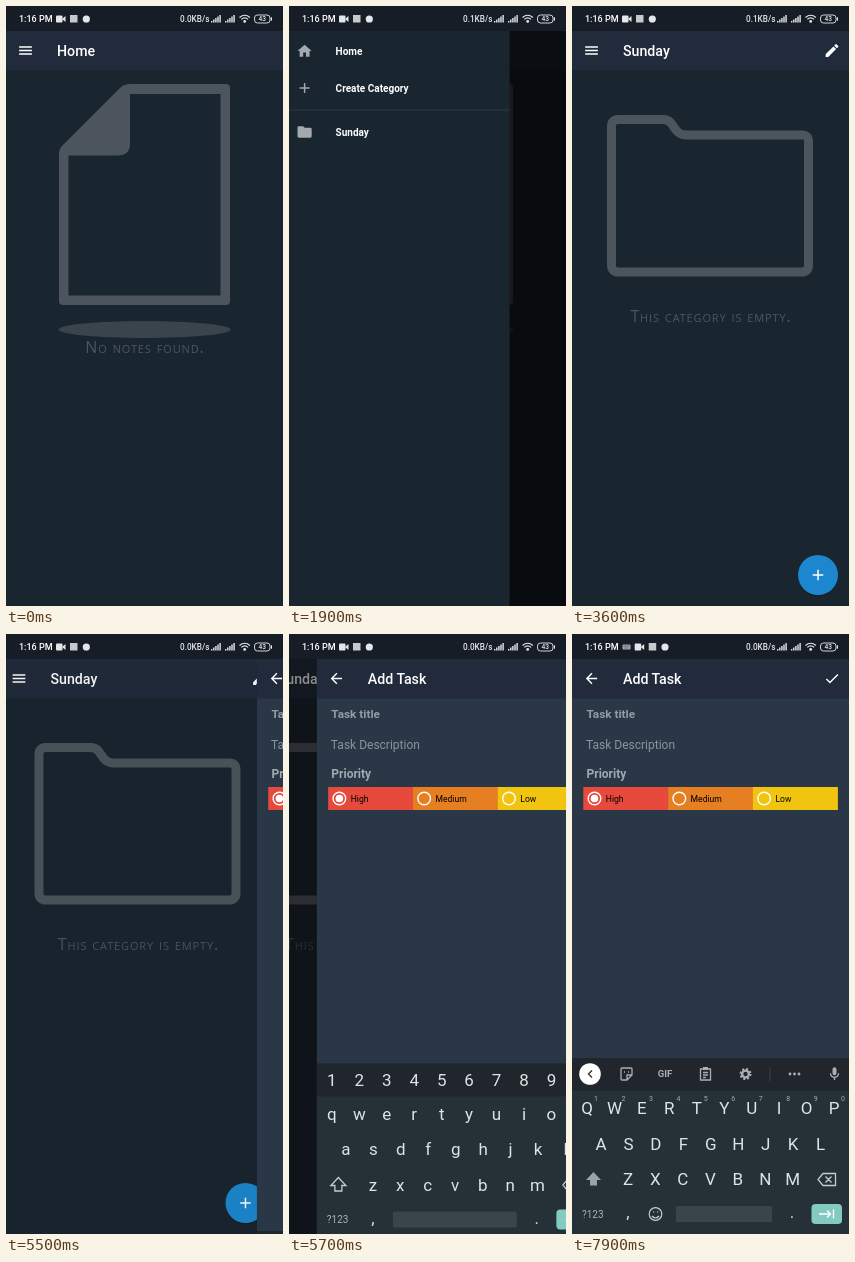
Animation of 277x600 px, one loop 8 s. Source, as an HTML page:

```html
<!DOCTYPE html>
<html lang="en">
<head>
<meta charset="utf-8">
<title>Notes app</title>
<style>
  html, body { margin: 0; width: 100%; height: 100%; overflow: hidden; background: #19252f; }
  svg { display: block; width: 100%; height: 100%; font-family: Roboto, sans-serif; }
  .empty { font: small-caps 16px "Open Sans", sans-serif; letter-spacing: .85px; fill: #4c5660; }
  .title { font-size: 14.2px; font-weight: 500; fill: #fff; }
  .key { font-size: 17px; fill: #dde3e6; }
  .item { font-size: 10px; font-weight: 700; fill: #fff; }
</style>
</head>
<body>
<svg id="stage" viewBox="0 0 277 600"></svg>
<script>
const LOOP = 8000, W = 277, DRAWER = 225;

const ICONS = {
  menu: 'M3 18h18v-2H3zM3 13h18v-2H3zM3 6v2h18V6z',
  back: 'M20 11H7.83l5.59-5.59L12 4l-8 8 8 8 1.41-1.41L7.83 13H20z',
  check: 'M9 16.17L4.83 12l-1.42 1.41L9 19 21 7l-1.41-1.41z',
  edit: 'M3 17.25V21h3.75L17.81 9.94l-3.75-3.75zM20.71 7.04a1 1 0 000-1.41l-2.34-2.34a1 1 0 00-1.41 0l-1.83 1.83 3.75 3.75z',
  add: 'M19 13h-6v6h-2v-6H5v-2h6V5h2v6h6z',
  home: 'M10 20v-6h4v6h5v-8h3L12 3 2 12h3v8z',
  folder: 'M10 4H4a2 2 0 00-2 2v12a2 2 0 002 2h16a2 2 0 002-2V8a2 2 0 00-2-2h-8z',
  mic: 'M12 14a3 3 0 003-3V5a3 3 0 00-6 0v6a3 3 0 003 3zm5-3a5 5 0 01-10 0H5a7 7 0 006 6.9V21h2v-3.1A7 7 0 0019 11z'
};

const rect = (x, y, w, h, fill, more = '') =>
  `<rect x="${x}" y="${y}" width="${w}" height="${h}" fill="${fill}" ${more}/>`;
const text = (x, y, s, more = '') => `<text x="${x}" y="${y}" ${more}>${s}</text>`;
const middle = (x, y, s, more = '') => text(x, y, s, `text-anchor="middle" ${more}`);
const circle = (x, y, r, more) => `<circle cx="${x}" cy="${y}" r="${r}" ${more}/>`;
const line = (d, color, width = 1.3, more = '') =>
  `<path d="${d}" fill="none" stroke="${color}" stroke-width="${width}" ${more}/>`;
const icon = (name, x, y, fill = '#fff', size = 17) =>
  `<path d="${ICONS[name]}" fill="${fill}" transform="translate(${x - size / 2} ${y - size / 2}) scale(${size / 24})"/>`;
const group = (id, body) => `<g id="${id}">${body}</g>`;

const header = (title, left, right = '') =>
  rect(0, 25, W, 39.5, '#212b3b') + icon(left, 19.5, 44.5) +
  text(51, 50, title, 'class="title"') + (right && icon(right, 260, 44.5));

function homePage() {
  const sheet = 'M53 147q0-4 3-7L114 82Q118 78 124 78H220q4 0 4 4V295q0 4-4 4H57q-4 0-4-4Z' +
    'M62.5 149.5V289.5H214.5V88H124V137.5q0 12-12 12Z';
  return header('Home', 'menu') +
    `<path d="${sheet}" fill="#4c545d" fill-rule="evenodd"/>` +
    '<ellipse cx="138.5" cy="323.5" rx="86" ry="8.5" fill="#3a444d"/>' +
    middle(139, 347, 'No notes found.', 'class="empty"');
}

function categoryPage() {
  const folder = 'M46.5 113.5H91Q96 113.5 99 117L104 124Q108 129 114 129H230q6.5 0 6.5 6.5V259' +
    'q0 7-7 7H46.5q-7 0-7-7V120.5q0-7 7-7Z';
  return header('Sunday', 'menu', 'edit') + line(folder, '#4c545c', 9) +
    middle(139, 316, 'This category is empty.', 'class="empty"') +
    circle(246, 570.5, 20, 'fill="#000" opacity=".2"') +
    circle(246, 569, 20, 'fill="#1c87cf"') + icon('add', 246, 569, '#fff', 18);
}

function drawer() {
  const item = (y, name, s) => icon(name, 20, y, '#a3a9ae') + text(51, y + 3.5, s, 'class="item"');
  return rect(0, 25, DRAWER, 575, '#19252f') + item(45, 'home', 'Home') +
    item(82, 'add', 'Create Category') + rect(0, 103.5, DRAWER, 1, '#2e3a44') +
    item(126, 'folder', 'Sunday');
}

function taskPage() {
  const options = [['High', '#e74a3c'], ['Medium', '#e67e22'], ['Low', '#f1c40f']];
  const bar = options.map(([label, color], i) => {
    const x = 11.3 + i * 84.8;
    return rect(x, 153, 85, 23, color) +
      circle(x + 11.2, 164.5, 6.3, 'fill="none" stroke="#fff" stroke-width="1.4"') +
      (i ? '' : circle(x + 11.2, 164.5, 3.8, 'fill="#fff"')) +
      text(x + 22.5, 167.6, label, 'font-size="8.6"');
  }).join('');
  return rect(0, 25, W, 575, '#2a3747') + header('Add Task', 'back', 'check') +
    text(14.5, 84, 'Task title', 'font-size="11.8" font-weight="700" fill="#949ba3"') +
    text(14, 115, 'Task Description', 'font-size="12" fill="#8c949c"') +
    text(14.5, 144, 'Priority', 'font-size="12" font-weight="700" fill="#a2a8ae"') +
    bar + `<rect id="cursor" x="14" y="71" width="1.4" height="17" fill="#2f9bdc"/>`;
}

function keyRows(upper) {
  const place = (letters, x, baseline) => [...letters].map((c, i) =>
    middle(x + 27.45 * i, baseline, upper ? c.toUpperCase() : c, 'class="key"')).join('');
  return place('qwertyuiop', 15, 480) + place('asdfghjkl', 29, 515.5) + place('zxcvbnm', 56, 551);
}

function toolbar() {
  const c = '#a9b0b4';
  const teeth = circle(173.5, 440, 5, `fill="none" stroke="${c}" stroke-width="2" stroke-dasharray="2 1.927"`);
  return circle(18, 440, 10.8, 'fill="#fff"') + line('M20 436.5l-3.5 3.5 3.5 3.5', '#333', 1.4) +
    line('M50 434h9q1 0 1 1v6l-5 5h-5q-1 0-1-1v-10q0-1 1-1zM55 446v-5h5M52 438h1M56 438h1', c) +
    middle(93, 443.4, 'GIF', `font-size="9.5" font-weight="700" fill="${c}"`) +
    line('M128.5 435h10v11h-10zM131 438.5h5M131 441h5M131 443.5h3', c) + rect(131, 433, 5, 3, c) +
    circle(173.5, 440, 3.4, `fill="none" stroke="${c}" stroke-width="2.4"`) + teeth +
    rect(197.5, 433, 1, 14, '#3b444a') +
    [218, 222.5, 227].map(x => circle(x, 440, 1.4, `fill="${c}"`)).join('') +
    icon('mic', 262.5, 440, c, 16);
}

function keyboard() {
  const c = '#c5ccd0', shift = 'M21.5 538l-7.5 8h4v5.5h7v-5.5h4z';
  const digits = [...'1234567890'];
  const small = 'font-size="7" fill="#a5adb1"';
  const base = rect(0, 424, W, 176, '#253037') + rect(0, 424, W, 33, '#20262b') +
    line('M251 539.5h12.5v12h-12.5l-5-6zM253.5 542.5l6 6M259.5 542.5l-6 6', c) +
    text(10, 583.5, '?123', 'font-size="10" fill="#aab2b6"') +
    middle(56, 584, ',', 'class="key"') + middle(220, 584, '.', 'class="key"') +
    rect(239.5, 570, 30.5, 20, '#83cac1', 'rx="4"');
  const lower = digits.map((d, i) => middle(15 + 27.45 * i, 446, d, 'class="key"')).join('') +
    keyRows(false) + line(shift, c) + rect(76, 572, 124, 16, '#39454b', 'rx="2"') +
    line('M260.5 576v4.5h-11M253 577l-3.5 3.5 3.5 3.5', '#fff', 1.4);
  const upper = group('toolbar', toolbar()) + keyRows(true) +
    digits.map((d, i) => middle(24 + 27.45 * i, 467, d, small)).join('') +
    `<path d="${shift}" fill="#9aa3a7"/>` + rect(104, 572, 96, 16, '#39454b', 'rx="2"') +
    circle(83.5, 580, 6.3, `fill="none" stroke="${c}" stroke-width="1.2"`) +
    line('M80 582q3.5 4 7 0M81 578h1.2M85 578h1.2', c, 1.2) +
    line('M247 580h11.5M255 576.5l3.5 3.5-3.5 3.5M261.5 575.5v9', '#fff', 1.4);
  return base + group('lower', lower) + group('upper', upper);
}

function statusBar() {
  const c = '#e4e7e9';
  const signal = x => [0, 1, 2, 3, 4].map(i => rect(x + i * 2.1, 15 - i * 1.5, 1.4, 1.5 + i * 1.5, c)).join('');
  const notices = rect(50, 9.5, 6.5, 7, c, 'rx="1"') + `<path d="M56 13l3.5-3v6z" fill="${c}"/>` +
    rect(64, 9, 7.5, 7.5, '#c5c9cc') + circle(80.3, 13, 3.6, `fill="${c}"`);
  const keyIcon = rect(50.5, 10.5, 8, 5, '#aab0b5', 'rx="1"') + line('M51.5 12h6M52.5 14h4', '#161d26', .8, 'stroke-dasharray="1 .6"');
  return rect(0, 0, W, 25, '#161d27') +
    text(13, 16, '1:16 PM', `font-size="9" font-weight="500" fill="#fff"`) +
    group('keyIcon', keyIcon) + group('notices', notices) +
    `<text id="speed" x="174" y="16" font-size="8.2" font-weight="500" fill="${c}"></text>` +
    signal(205) + signal(219) +
    line('M233.5 11.5q5.2-4.5 10.4 0M235.3 13.4q3.4-3 6.8 0', c, 1.2) + circle(238.7, 15.4, 1.4, `fill="${c}"`) +
    rect(248.5, 9, 15.5, 8, 'none', `rx="3" stroke="${c}" stroke-width=".9"`) + rect(264.8, 11.3, 1.2, 3.4, c) +
    middle(256.2, 15.4, '43', `font-size="6.6" font-weight="500" fill="${c}"`);
}

const stage = document.getElementById('stage');
stage.innerHTML = rect(0, 0, W, 600, '#0d1319') +
  group('under', rect(0, 0, W, 600, '#19252f') + group('home', homePage()) + group('category', categoryPage())) +
  rect(0, 25, W, 575, '#000', 'id="scrim"') + group('drawer', drawer()) +
  group('task', taskPage() + group('keyboard', keyboard())) +
  group('status', statusBar());

const el = id => document.getElementById(id);
const show = (id, on) => el(id).style.display = on ? '' : 'none';
const move = (id, x, y = 0) => el(id).setAttribute('transform', `translate(${x} ${y})`);
// Share of the way still to go, for a move that starts at `start`
const decay = (t, start, tau) => {
  const rest = Math.exp(-Math.max(0, t - start) / tau);
  return rest < .006 ? 0 : rest;
};

function draw(t) {
  const open = t < 2505 ? 1 - decay(t, 1546, 90) : decay(t, 2505, 90);
  const pushLeft = decay(t, 5491, 91);
  const pushed = 1 - pushLeft;

  show('home', t < 2505);
  show('category', t >= 2505);
  show('drawer', open > 0);
  move('drawer', DRAWER * (open - 1));
  el('scrim').setAttribute('opacity', Math.max(.7 * open, .5 * pushed));

  move('under', -W * .25 * pushed);
  show('task', pushed > 0);
  move('task', W * pushLeft);
  move('keyboard', 0, 176 * decay(t, 5499, 58));
  show('cursor', t >= 6400 && (t - 6400) % 1000 < 500);

  const caps = t >= 6500;
  show('lower', !caps);
  show('upper', caps);
  el('toolbar').setAttribute('opacity', Math.min(1, Math.max(0, (t - 6400) / 300)));

  const typing = t >= 5900;
  show('keyIcon', typing);
  move('notices', typing ? 12.7 : 0);
  el('speed').textContent = t >= 1100 && t < 5100 ? '0.1KB/s' : '0.0KB/s';
}

const begin = performance.now();
function tick() {
  draw(Math.floor((performance.now() - begin) % LOOP / 100) * 100);
  requestAnimationFrame(tick);
}
tick();
</script>
</body>
</html>
```
